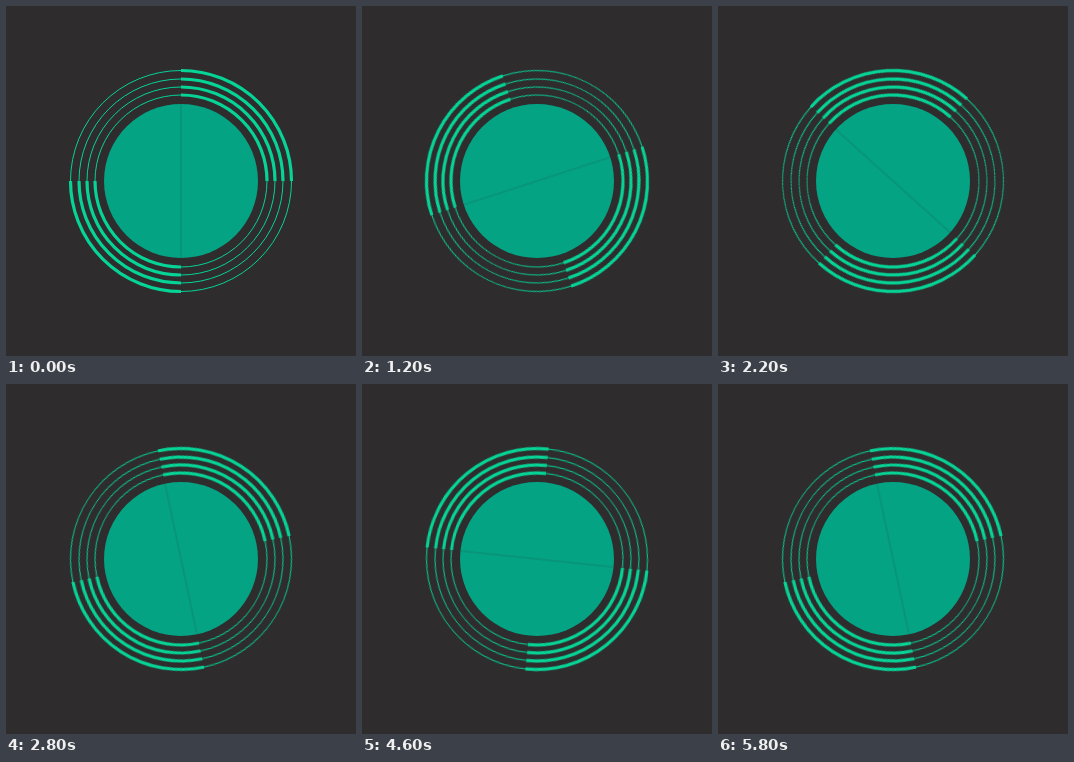
An HTML page that plays this animation: 350x350 px, repeating every 6000 ms.

```html
<!DOCTYPE html>
<html lang="en">
<head>
<meta charset="utf-8">
<title>Turning rings</title>
<style>
  html, body { margin: 0; width: 100%; height: 100%; overflow: hidden; background: #2e2c2d; }
  svg { display: block; width: 100vw; height: 100vh; }
  .disk { fill: #03a383; }
  .seam { stroke: #2e2c2d; stroke-width: 1; opacity: .22; }
  .ring { fill: none; stroke: #06d496; stroke-width: 1; }
  .arc { fill: none; stroke: #06d496; stroke-width: 3.2; }
  .turn { animation: turn 6s steps(30, end) infinite; }
  @keyframes turn { to { transform: rotate(360deg); } }
</style>
</head>
<body>
<svg viewBox="-175 -175 350 350">
  <circle class="disk" r="77"/>
  <g class="turn" id="turn">
    <path class="seam" d="M0 -77V77"/>
  </g>
</svg>
<script>
  const turn = document.getElementById('turn');

  function add(tag, attrs) {
    const el = document.createElementNS('http://www.w3.org/2000/svg', tag);
    for (const key in attrs) el.setAttribute(key, attrs[key]);
    turn.append(el);
  }

  // Each ring is a thin circle with two opposite quarters drawn heavier.
  for (const r of [86, 94, 102, 110.5]) {
    add('circle', { class: 'ring', r });
    add('path', {
      class: 'arc',
      d: `M0 ${-r}A${r} ${r} 0 0 1 ${r} 0M0 ${r}A${r} ${r} 0 0 1 ${-r} 0`
    });
  }
</script>
</body>
</html>
```
